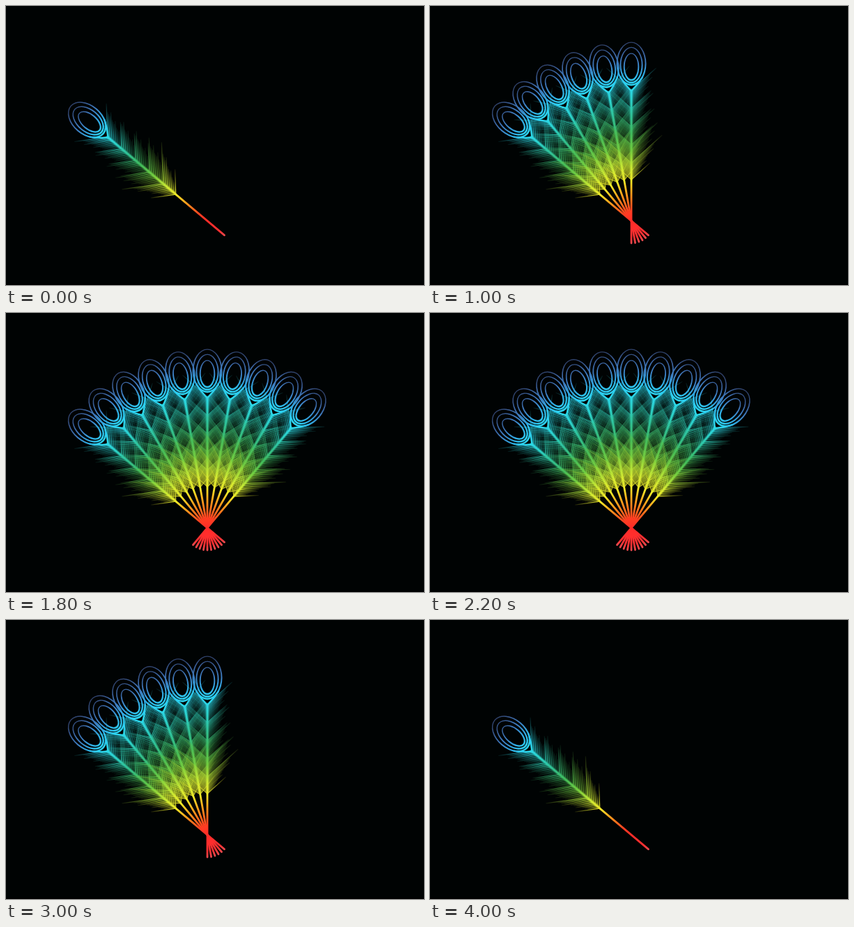
These frames come from a looping animation (600x400 px, 4.2 s). An HTML page with a canvas:

```html
<!DOCTYPE html>
<html lang="en">
<head>
<meta charset="utf-8">
<title>Feather fan</title>
<style>
  html, body { margin: 0; width: 100%; height: 100%; overflow: hidden; background: #000303; }
  canvas { display: block; }
</style>
</head>
<body>
<canvas id="stage" width="600" height="400"></canvas>
<script>
const ctx = document.getElementById('stage').getContext('2d');
const PIVOT = { x: 289, y: 308 };
const STEP = 200, FEATHERS = 11, LOOP = 4200;
const BASE = -32, BARB_START = 59, KNOT = 187, TOP = 257;
const LEAN = 48 * Math.PI / 180;
const TUFT = 25.6;

// Distance from the pivot along the shaft, and the colour there
const RAMP = [
  [-33, 232, 72, 76], [-24, 255, 48, 50], [0, 255, 44, 40], [14, 255, 62, 34],
  [28, 255, 112, 28], [42, 255, 168, 28], [58, 240, 234, 40], [76, 204, 234, 52],
  [100, 116, 206, 62], [125, 64, 188, 92], [150, 48, 194, 150],
  [172, 44, 210, 200], [188, 44, 216, 232], [198, 44, 206, 240],
  [210, 48, 170, 226], [226, 62, 126, 194], [242, 58, 94, 152], [257, 46, 62, 100]
];

function colour(r, alpha = 1) {
  let i = 1;
  while (i < RAMP.length - 1 && RAMP[i][0] < r) i++;
  const a = RAMP[i - 1], b = RAMP[i];
  const k = Math.min(1, Math.max(0, (r - a[0]) / (b[0] - a[0])));
  const rgb = [1, 2, 3].map(c => Math.round(a[c] + (b[c] - a[c]) * k));
  return `rgba(${rgb},${alpha})`;
}

const shade = ctx.createLinearGradient(0, -BASE, 0, -TOP);
for (const [r] of RAMP) {
  const k = (r - BASE) / (TOP - BASE);
  shade.addColorStop(Math.min(1, Math.max(0, k)), colour(r));
}

function line(x1, y1, x2, y2, width) {
  ctx.lineWidth = width;
  ctx.beginPath();
  ctx.moveTo(x1, y1);
  ctx.lineTo(x2, y2);
  ctx.stroke();
}

// Longest barbs sit low on the vane
function reach(s) {
  if (s < 88) return 36 + (s - BARB_START) * 1.06;
  return 48 + 19 * Math.exp(-(s - 88) / 16);
}

// Each tuft starts long and bright at its upper end and thins out below
function barbs() {
  ctx.lineCap = 'butt';
  for (let n = 0, s = KNOT; s >= BARB_START; n++, s -= 2) {
    const p = (KNOT - s) / TUFT % 1;
    const len = reach(s) * (1 - 0.5 * p) * (n % 4 ? 0.8 : 1);
    const low = Math.max(0, 1 - (s - BARB_START) / 60);
    const glow = 1 - (0.65 - 0.4 * low) * p;
    const dx = len * Math.sin(LEAN), dy = len * Math.cos(LEAN);
    for (const side of [-1, 1]) {
      const fade = ctx.createLinearGradient(0, -s, side * dx, -s - dy);
      fade.addColorStop(0, colour(s, 0.95 * glow));
      fade.addColorStop(0.35, colour(s + 4, 0.68 * glow));
      fade.addColorStop(0.7, colour(s + 2, 0.36 * glow));
      fade.addColorStop(1, colour(s, 0.08));
      ctx.strokeStyle = fade;
      line(0, -s, side * dx, -s - dy, 1.15);
    }
  }
}

function shaft() {
  ctx.strokeStyle = shade;
  ctx.lineCap = 'round';
  line(0, -BASE, 0, -BARB_START, 2.8);
  line(0, -BARB_START, 0, -KNOT, 2.6);
  ctx.globalAlpha = 0.4;
  line(0, -BARB_START - 4, 0, -KNOT, 5);
  ctx.globalAlpha = 1;
  for (const side of [-1, 1]) {
    ctx.lineWidth = 2.4;
    ctx.beginPath();
    ctx.moveTo(0, -KNOT + 1);
    ctx.quadraticCurveTo(side * 9, -195, side * 16, -206);
    ctx.stroke();
  }
}

// Closed band, heavier at the bottom than at the top
function ring(r, rx, ry) {
  ctx.beginPath();
  ctx.ellipse(0, -r, rx + 1, ry + 1, 0, 0, 2 * Math.PI);
  ctx.ellipse(0, -r - 0.7, rx - 1, ry - 1, 0, 0, 2 * Math.PI);
  ctx.fill('evenodd');
}

function eye() {
  ctx.fillStyle = shade;
  ring(225, 20.5, 30.5);
  ring(223, 15.6, 25.2);
  ring(220.5, 10.3, 19);
}

function feather(i) {
  ctx.save();
  ctx.translate(PIVOT.x, PIVOT.y);
  ctx.rotate((i - 5) * Math.PI / 18);
  barbs();
  shaft();
  eye();
  ctx.restore();
}

function draw(count) {
  ctx.fillStyle = '#000303';
  ctx.fillRect(0, 0, 600, 400);
  ctx.fillStyle = '#000';
  ctx.fillRect(0, 398, 600, 2);
  for (let i = 0; i < count; i++) feather(i);
}

let shown = 0;
function tick() {
  const step = Math.floor(performance.now() % LOOP / STEP);
  const count = step < FEATHERS ? step + 1 : 2 * FEATHERS - 1 - step;
  if (count !== shown) draw(shown = count);
  requestAnimationFrame(tick);
}
tick();
</script>
</body>
</html>
```
